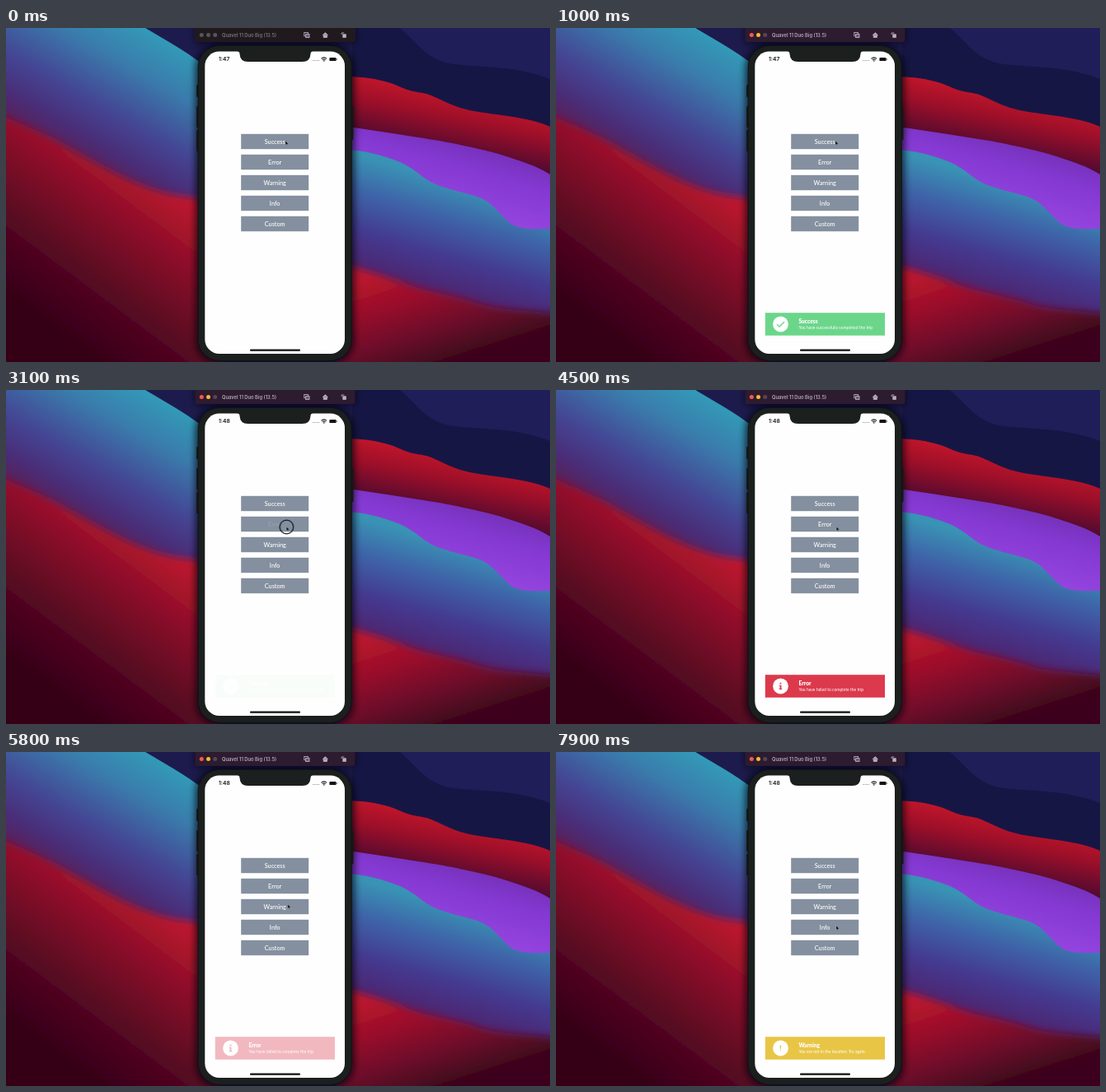
Animation, 660 px wide and 406 px high, one loop 8 s. Source, as an HTML page:

```html
<!DOCTYPE html>
<html lang="en">
<head>
<meta charset="utf-8">
<title>Toast messages</title>
<style>
html, body { margin: 0; width: 100%; height: 100%; overflow: hidden; background: #15184a; }
svg { display: block; width: 100vw; height: 100vh; }
text { font-family: Lato, "Open Sans", sans-serif; fill: #fff; }
.ui { font-family: Inter, Roboto, sans-serif; }
.labels text { font-size: 7.3px; font-weight: 500; text-anchor: middle; }
.head { font-size: 6.7px; font-weight: 900; }
.sub { font-size: 5.05px; }

.loop { animation: 8s linear infinite; }
.jump { animation-timing-function: step-end; }

.idle { animation-name: idle; }
.active { animation-name: active; }
.before { animation-name: before; }
.after { animation-name: after; }
@keyframes idle { 0% { opacity: 1 } 2.5%, 100% { opacity: 0 } }
@keyframes active { 0% { opacity: 0 } 2.5%, 100% { opacity: 1 } }
@keyframes before { 0% { opacity: 1 } 18.75%, 100% { opacity: 0 } }
@keyframes after { 0% { opacity: 0 } 18.75%, 100% { opacity: 1 } }

.cursor { animation-name: move; }
@keyframes move {
  0%, 22.5% { transform: translate(339px, 137px); animation-timing-function: ease-in-out }
  27.5%, 62.5% { transform: translate(340.2px, 166px); animation-timing-function: ease-in-out }
  68.75%, 90% { transform: translate(341.8px, 185px); animation-timing-function: ease-in-out }
  95%, 100% { transform: translate(340px, 211px) }
}

.ring { animation-name: ring; }
@keyframes ring {
  0% { opacity: 0 } 2.5% { opacity: 1 } 5% { opacity: 0 }
  37.5% { opacity: 1 } 40% { opacity: 0 }
  73.75% { opacity: 1 } 76.25%, 100% { opacity: 0 }
}

.press1 { animation-name: press1; }
.press2 { animation-name: press2; }
.press3 { animation-name: press3; }
@keyframes press1 { 0%, 2% { opacity: 1 } 3%, 5% { opacity: .15 } 7.5%, 100% { opacity: 1 } }
@keyframes press2 { 0%, 37% { opacity: 1 } 38%, 40% { opacity: .15 } 42.5%, 100% { opacity: 1 } }
@keyframes press3 { 0%, 73% { opacity: 1 } 74%, 76.25% { opacity: .15 } 78.5%, 100% { opacity: 1 } }

.done { animation-name: done; }
.error { animation-name: error; }
.warn { animation-name: warn; }
@keyframes done { 0%, 5% { opacity: 0 } 8.75%, 35% { opacity: 1 } 38.9%, 100% { opacity: 0 } }
@keyframes error { 0%, 41.25% { opacity: 0 } 45%, 70% { opacity: 1 } 73.9%, 100% { opacity: 0 } }
@keyframes warn { 0%, 75.5% { opacity: 0 } 78.75%, 100% { opacity: 1 } }

.icon { animation: pulse 1s ease-in-out infinite alternate; }
.done .icon { animation-delay: -.8s; }
.error .icon { animation-delay: -1.9s; }
.warn .icon { animation-delay: -1.1s; }
@keyframes pulse { from { transform: scale(1.05) } to { transform: scale(.68) } }
</style>
</head>
<body>
<svg viewBox="0 0 660 406" preserveAspectRatio="none">
  <defs>
    <linearGradient id="tealL" gradientUnits="userSpaceOnUse" x1="190" y1="8" x2="96" y2="170">
      <stop offset="0" stop-color="#329cb8"/><stop offset=".28" stop-color="#3a7cac"/>
      <stop offset=".6" stop-color="#444694"/><stop offset=".82" stop-color="#4a2d78"/>
      <stop offset="1" stop-color="#5c1d52"/>
    </linearGradient>
    <linearGradient id="redL" gradientUnits="userSpaceOnUse" x1="215" y1="200" x2="80" y2="380">
      <stop offset="0" stop-color="#c2182e"/><stop offset=".3" stop-color="#8e0f2a"/>
      <stop offset=".65" stop-color="#580722"/><stop offset="1" stop-color="#360418"/>
    </linearGradient>
    <linearGradient id="redR" gradientUnits="userSpaceOnUse" x1="500" y1="70" x2="485" y2="142">
      <stop offset="0" stop-color="#c3162a"/><stop offset=".42" stop-color="#9c0f29"/>
      <stop offset="1" stop-color="#4d0a30"/>
    </linearGradient>
    <linearGradient id="violet" gradientUnits="userSpaceOnUse" x1="560" y1="138" x2="535" y2="225">
      <stop offset="0" stop-color="#7430b8"/><stop offset=".35" stop-color="#8439d2"/>
      <stop offset="1" stop-color="#9746e0"/>
    </linearGradient>
    <linearGradient id="tealR" gradientUnits="userSpaceOnUse" x1="550" y1="190" x2="510" y2="327">
      <stop offset="0" stop-color="#3993b5"/><stop offset=".3" stop-color="#3e63a8"/>
      <stop offset=".62" stop-color="#443a90"/><stop offset=".86" stop-color="#4b2977"/>
      <stop offset="1" stop-color="#5c1d5c"/>
    </linearGradient>
    <linearGradient id="redB" gradientUnits="userSpaceOnUse" x1="450" y1="295" x2="490" y2="420">
      <stop offset="0" stop-color="#bd152d"/><stop offset=".35" stop-color="#980f2b"/>
      <stop offset=".7" stop-color="#690a29"/><stop offset="1" stop-color="#3c061c"/>
    </linearGradient>
    <filter id="soft" x="-10%" y="-10%" width="120%" height="120%"><feGaussianBlur stdDeviation="5"/></filter>
    <circle id="disc" cx="272.5" cy="360" r="9.4" fill="#fff"/>
  </defs>

  <!-- wallpaper -->
  <rect width="660" height="406" fill="#1d1b4d"/>
  <path d="M478 0C500 18 510 40 545 44S620 46 660 62V150H420V0Z" fill="#161645"/>
  <path d="M478 0C500 18 510 40 545 44S620 46 660 62V0Z" fill="#1f1e58"/>
  <path d="M169 0C193 14 216 27 240 45V230H0Z" fill="url(#tealL)"/>
  <path d="M0 0H169L240 230H0Z" fill="url(#tealL)"/>
  <path d="M-20 102C30 118 70 143 110 165S180 199 205 203S235 207 260 210V430H-20Z" fill="url(#redL)" filter="url(#soft)"/>
  <path d="M415 59C440 60 448 62 460 65S480 73 490 76S506 78 516 82S538 93 551 97S575 102 587 104S640 110 660 120V190H415Z" fill="url(#redR)"/>
  <path d="M415 120C445 124 473 129 500 133S537 139 560 144S595 152 610 157S645 168 660 178V260H415Z" fill="url(#violet)"/>
  <path d="M415 148C434 149 455 154 478 163C498 172 506 184 521 190S560 201 574 206C593 213 600 230 616 240C630 246 648 244 660 244V365H415Z" fill="url(#tealR)"/>
  <path d="M400 286C440 295 465 304 490 313S540 324 570 334S628 342 680 349V430H400Z" fill="url(#redB)" filter="url(#soft)"/>

  <!-- shadows -->
  <g fill="#08060f" filter="url(#soft)">
    <rect x="230" y="20" width="192.5" height="388" rx="28" opacity=".75"/>
    <rect x="229" y="-4" width="195" height="23" opacity=".6"/>
  </g>

  <!-- window bar -->
  <rect x="229.5" y="-4" width="194" height="21" rx="3" fill="#2d1b2f"/>
  <g class="loop jump idle">
    <rect x="229.5" y="-4" width="194" height="21" rx="3" fill="#201a1e"/>
    <g fill="#57545a"><circle cx="237.3" cy="8.5" r="2.5"/><circle cx="245.5" cy="8.5" r="2.5"/><circle cx="253.7" cy="8.5" r="2.5"/></g>
    <text class="ui" x="262" y="10.8" font-size="5.8" font-weight="600" style="fill:#77727a">Quavel 11 Duo Big (13.5)</text>
  </g>
  <g class="loop jump active">
    <circle cx="237.3" cy="8.5" r="2.5" fill="#fc5750"/><circle cx="245.5" cy="8.5" r="2.5" fill="#f9b92f"/>
    <circle cx="253.7" cy="8.5" r="2.5" fill="#55465a"/>
    <text class="ui" x="262" y="10.8" font-size="5.8" font-weight="600" style="fill:#b5a9b8">Quavel 11 Duo Big (13.5)</text>
  </g>
  <g fill="none" stroke="#b9aebb" stroke-width=".9">
    <rect x="361.8" y="5.5" width="4.6" height="4.2"/><rect x="363.6" y="7.4" width="4.4" height="4.2" fill="#6b5a6d"/>
    <path d="M384 8.8L387.3 5.7L390.6 8.8M385.2 8.6V11.5H389.4V8.6" fill="#b9aebb"/>
    <path d="M407.2 8V6H410.3"/><rect x="408.8" y="7.8" width="3.5" height="3.6" fill="#b9aebb"/>
  </g>

  <!-- phone -->
  <g fill="#151817">
    <rect x="231" y="69" width="4" height="15" rx="1"/><rect x="231" y="95" width="4" height="26" rx="1"/>
    <rect x="231" y="124" width="4" height="26" rx="1"/><rect x="418" y="95" width="3.5" height="41" rx="1"/>
  </g>
  <rect x="233.2" y="21.5" width="186" height="382.8" rx="26" fill="#1b201e" stroke="#111413"/>
  <rect x="241.3" y="28.5" width="169.7" height="367.5" rx="17.5" fill="#fefefe"/>
  <path d="M280.5 28H372.5Q369.5 28.6 369.5 31.5Q369 41 359.5 41H293.5Q284 41 283.5 31.5Q283.5 28.6 280.5 28Z" fill="#1b201e"/>
  <g font-size="6.7" font-weight="600">
    <text class="ui loop jump before" x="258" y="40.4" style="fill:#111">1:47</text>
    <text class="ui loop jump after" x="258" y="40.4" style="fill:#111">1:48</text>
  </g>
  <path d="M372.2 39.5H380" stroke="#999" stroke-dasharray="1.2 1"/>
  <g fill="none" stroke="#111" stroke-width="1.1">
    <path d="M382.5 37.3Q385.8 34.4 389.1 37.3"/><path d="M383.9 38.8Q385.8 37.2 387.7 38.8"/>
  </g>
  <circle cx="385.8" cy="40" r=".8" fill="#111"/>
  <rect x="392.4" y="35.9" width="8.2" height="4.2" rx="1.2" fill="#111"/><rect x="401.1" y="37.2" width=".8" height="1.6" fill="#555"/>
  <rect x="296" y="390.6" width="61" height="2.1" rx="1" fill="#111"/>

  <!-- buttons -->
  <g fill="#84909f">
    <rect x="285.2" y="128.8" width="82" height="18.4"/><rect x="285.2" y="153.8" width="82" height="18.4"/>
    <rect x="285.2" y="178.8" width="82" height="18.4"/><rect x="285.2" y="203.8" width="82" height="18.4"/>
    <rect x="285.2" y="228.8" width="82" height="18.4"/>
  </g>
  <g class="labels">
    <text class="loop press1" x="326.2" y="140.6">Success</text>
    <text class="loop press2" x="326.2" y="165.6">Error</text>
    <text class="loop press3" x="326.2" y="190.6">Warning</text>
    <text x="326.2" y="215.6">Info</text>
    <text x="326.2" y="240.6">Custom</text>
  </g>

  <!-- toasts -->
  <g class="loop done">
    <rect x="253.8" y="346.2" width="145.2" height="27.6" fill="#6bd68a"/>
    <use href="#disc"/>
    <g transform="translate(272.5 360)"><path class="icon" d="M-4.4 .2L-1.5 3L4.5 -3" fill="none" stroke="#6bd68a" stroke-width="1.4"/></g>
    <text class="head" x="294.4" y="359.2">Success</text>
    <text class="sub" x="294.4" y="366.3">You have successfully completed the trip</text>
  </g>
  <g class="loop error">
    <rect x="253.8" y="346.2" width="145.2" height="27.6" fill="#dc394c"/>
    <use href="#disc"/>
    <g transform="translate(272.5 360)"><path class="icon" d="M-1 -4.6H1V-2.7H-1ZM-1.7 -1.4H1V3.1H1.8V4.5H-1.8V3.1H-1V0H-1.7Z" fill="#dc394c"/></g>
    <text class="head" x="294.4" y="359.2">Error</text>
    <text class="sub" x="294.4" y="366.3">You have failed to complete the trip</text>
  </g>
  <g class="loop warn">
    <rect x="253.8" y="346.2" width="145.2" height="27.6" fill="#e9c546"/>
    <use href="#disc"/>
    <g transform="translate(272.5 360)"><path class="icon" d="M-1 -5H1L.7 1.7H-.7ZM-.9 3H.9V4.8H-.9Z" fill="#e0b52f"/></g>
    <text class="head" x="294.4" y="359.2">Warning</text>
    <text class="sub" x="294.4" y="366.3">You are not in the location. Try again.</text>
  </g>

  <!-- pointer -->
  <g class="loop cursor">
    <circle class="loop jump ring" cx=".2" cy=".5" r="8.3" fill="none" stroke="#15181b" stroke-width="1.3"/>
    <path d="M0 0V5.2L1.2 4.2L2 6L2.9 5.6L2.1 3.9H3.8Z" fill="#0b0b0b" stroke="#c9ced4" stroke-width=".35"/>
  </g>
</svg>
</body>
</html>
```
